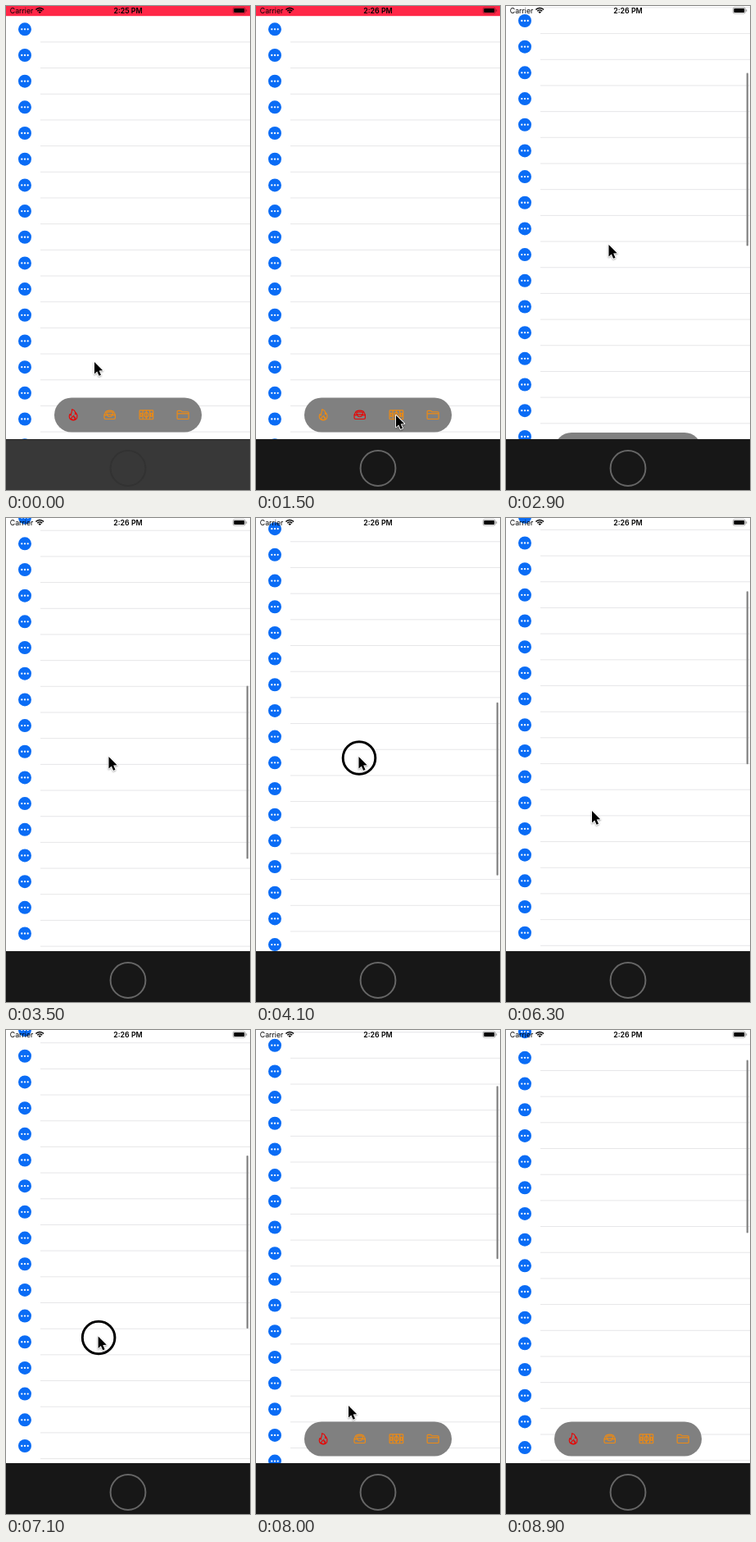
Write an HTML page with a canvas that moves like this. It is 298 px wide and 590 px high and loops after 9 s.

```html
<!DOCTYPE html>
<html lang="en">
<head>
<meta charset="utf-8">
<title>Hiding tab bar</title>
<style>
html, body { margin: 0; width: 100%; height: 100%; overflow: hidden; background: #fff; }
canvas { display: block; width: 298px; height: 590px; }
</style>
</head>
<body>
<canvas id="stage"></canvas>
<script>
const W = 298, H = 590, LOOP = 9000, STEP = 100;
const TOP = 12.2, BOTTOM = 528, PITCH = 31.68, ROWS = 40;
const RED = '#ff2747', ORANGE = '#ee8a12', ACTIVE = '#e80404';
const canvas = document.getElementById('stage');
const c = canvas.getContext('2d');
const dpr = window.devicePixelRatio || 1;
canvas.width = W * dpr;
canvas.height = H * dpr;

const linear = p => p;
const smooth = p => p * p * (3 - 2 * p);
const out = p => 1 - (1 - p) ** 2;

// Each key: [time, value, easing into this key]
function track(keys, t) {
  if (t <= keys[0][0]) return keys[0][1];
  for (let i = 1; i < keys.length; i++) {
    const [t1, v1, ease = linear] = keys[i], [t0, v0] = keys[i - 1];
    if (t <= t1) return v0 + (v1 - v0) * ease((t - t0) / (t1 - t0));
  }
  return keys[keys.length - 1][1];
}

const TAP = 5000;
const listA = [[2400, 0], [2700, 70, smooth], [2900, 168.7], [3900, 530, out],
  [4000, 528], [4100, 522], [4300, 468], [4900, 408, out]];
const listB = [[5600, 0], [5800, 25], [6300, 187.9], [6900, 350, out],
  [7000, 349], [7100, 345], [7400, 260], [9000, 57, out]];
const pillDrop = [[2700, 0], [2900, 42.5], [3000, 54, out], [4300, 54], [4600, 0, out],
  [5800, 0], [6100, 54], [7300, 54], [7600, 0, out]];
const cursorX = [[0, 108], [700, 126, smooth], [1000, 126], [1500, 171, smooth],
  [1900, 171], [2500, 125.5, smooth], [4100, 125.5], [4300, 126], [4850, 82, smooth],
  [5100, 82], [5600, 105, smooth], [6500, 105], [7000, 112.5, smooth],
  [7400, 113], [8100, 113], [8700, 306, smooth]];
const cursorY = [[0, 434], [700, 497, smooth], [1000, 497], [1500, 499, smooth],
  [1900, 499], [2500, 291, smooth], [4100, 291], [4300, 345], [4850, 506, smooth],
  [5100, 506], [5600, 357, smooth], [6500, 357], [7000, 372, smooth],
  [7100, 373.5], [7400, 458], [8100, 458], [8700, 400, smooth]];
const barAlpha = [[2400, 0], [2500, 1], [5000, 1], [5010, 0], [5600, 0], [5700, 1]];
const presses = [[800, 900], [1600, 1700], [4100, 4300], [5000, 5000], [7100, 7400]];

function line(x0, y0, x1, y1) {
  c.beginPath();
  c.moveTo(x0, y0);
  c.lineTo(x1, y1);
  c.stroke();
}

function disc(x, y, r, color) {
  c.fillStyle = color;
  c.beginPath();
  c.arc(x, y, r, 0, 7);
  c.fill();
}

function ring(x, y, r, color, width) {
  c.strokeStyle = color;
  c.lineWidth = width;
  c.beginPath();
  c.arc(x, y, r, 0, 7);
  c.stroke();
}

function box(x, y, w, h, r) {
  c.beginPath();
  c.roundRect(x, y, w, h, r);
}

function drawList(scroll) {
  c.fillStyle = '#fff';
  c.fillRect(0, 0, W, BOTTOM);
  const redEnd = Math.max(0, TOP - scroll);
  c.fillStyle = RED;
  c.fillRect(0, 0, W, redEnd);
  for (let i = 0; i < ROWS; i++) {
    const y = 28.3 + i * PITCH - scroll;
    if (y < -20 || y > BOTTOM + 10) continue;
    disc(23, y, 8, '#0a6cf5');
    for (const dx of [-3.7, 0, 3.7]) disc(23 + dx, y, 1.15, '#fff');
    c.strokeStyle = '#e0e0e2';
    c.lineWidth = 0.8;
    line(42, y + 15.6, W, y + 15.6);
  }
}

function drawScrollbar(scroll, alpha) {
  const view = BOTTOM - TOP, content = ROWS * PITCH;
  const len = 211;
  const y = 13 + scroll / (content - view) * (view - len);
  c.globalAlpha = alpha;
  c.fillStyle = '#8c8c8c';
  box(293.6, y, 2.4, len, 1.2);
  c.fill();
  c.globalAlpha = 1;
}

function drawStatus(time) {
  c.fillStyle = '#000';
  c.textBaseline = 'alphabetic';
  c.textAlign = 'left';
  c.font = '8.7px Inter, Arial, sans-serif';
  c.fillText('Carrier', 4.8, 8.9);
  c.textAlign = 'center';
  c.font = '600 8.8px Inter, Arial, sans-serif';
  c.fillText(time, 149, 8.9);
  // Wi-Fi fan
  c.strokeStyle = '#000';
  c.lineWidth = 1.5;
  for (const r of [3.9, 6.4]) {
    c.beginPath();
    c.arc(41.2, 8.8, r, -Math.PI * 0.77, -Math.PI * 0.23);
    c.stroke();
  }
  c.beginPath();
  c.moveTo(41.2, 9.1);
  c.arc(41.2, 9.1, 2.4, -Math.PI * 0.76, -Math.PI * 0.24);
  c.fill();
  // Battery
  c.strokeStyle = 'rgba(0,0,0,.45)';
  c.lineWidth = 0.7;
  box(277.2, 1.9, 15.2, 7.2, 2);
  c.stroke();
  box(278.3, 3, 13, 5, 1.1);
  c.fill();
  c.fillStyle = 'rgba(0,0,0,.5)';
  c.fillRect(293.3, 4.3, 0.9, 2.4);
}

function flame() {
  c.beginPath();
  c.moveTo(-1.6, -6.8);
  c.bezierCurveTo(2.8, -5.4, 3.2, -2.5, 2.4, -0.6);
  c.quadraticCurveTo(3.4, -1, 3.5, -2.4);
  c.bezierCurveTo(6.3, 1.6, 5, 6.4, 0.2, 6.6);
  c.bezierCurveTo(-4.8, 6.4, -5.6, 2.4, -4.1, -0.8);
  c.quadraticCurveTo(-3.3, 0.6, -2.6, 0.8);
  c.bezierCurveTo(-3.3, -2.6, -0.2, -3.4, -1.6, -6.8);
  c.moveTo(0.3, 1);
  c.bezierCurveTo(-0.2, 2.8, -2.6, 2.8, -2.2, 4.6);
  c.quadraticCurveTo(-1.5, 6.1, 0.2, 6.2);
  c.quadraticCurveTo(3.2, 5.8, 2.2, 3);
  c.quadraticCurveTo(1.6, 3.8, 1.2, 3.6);
  c.quadraticCurveTo(1.6, 2, 0.3, 1);
  c.stroke();
}

function tray() {
  c.beginPath();
  c.moveTo(-6.7, 0);
  c.lineTo(-4.6, -4);
  c.quadraticCurveTo(0, -6.4, 4.6, -4);
  c.lineTo(6.7, 0);
  c.lineTo(6.7, 3.8);
  c.quadraticCurveTo(6.7, 5.2, 5.3, 5.2);
  c.lineTo(-5.3, 5.2);
  c.quadraticCurveTo(-6.7, 5.2, -6.7, 3.8);
  c.closePath();
  c.moveTo(-6.7, 0.3);
  c.lineTo(-3, 0.3);
  c.quadraticCurveTo(-2.4, 2.4, 0, 2.4);
  c.quadraticCurveTo(2.4, 2.4, 3, 0.3);
  c.lineTo(6.7, 0.3);
  c.moveTo(4, -1.8);
  c.ellipse(0, -1.8, 4, 1.6, 0, 0, 7);
  c.stroke();
}

function note() {
  box(-8.3, -5.4, 16.6, 10.8, 0.8);
  c.stroke();
  c.beginPath();
  c.ellipse(0, 0, 2.3, 3, 0, 0, 7);
  c.stroke();
  line(0, -5.4, 0, 5.4);
  for (const s of [-1, 1]) {
    line(s * 4.2, -5.4, s * 4.2, 5.4);
    box(s * 6.2 - 1.1, -2, 2.2, 4, 0.8);
    c.stroke();
  }
}

function folder() {
  c.beginPath();
  c.moveTo(-7, -4);
  c.quadraticCurveTo(-7, -5, -6, -5);
  c.lineTo(-2.6, -5);
  c.lineTo(-1.2, -3.6);
  c.lineTo(6, -3.6);
  c.quadraticCurveTo(7, -3.6, 7, -2.6);
  c.lineTo(7, 4.2);
  c.quadraticCurveTo(7, 5.2, 6, 5.2);
  c.lineTo(-6, 5.2);
  c.quadraticCurveTo(-7, 5.2, -7, 4.2);
  c.closePath();
  c.moveTo(-7, -1.5);
  c.lineTo(7, -1.5);
  c.stroke();
}

const icons = [flame, tray, note, folder];

function drawPill(drop, selected) {
  c.fillStyle = '#808080';
  box(59, 477.5 + drop, 180, 42, 21);
  c.fill();
  icons.forEach((icon, i) => {
    c.save();
    c.translate(82 + i * 44.7, 498.3 + drop);
    c.strokeStyle = i === selected ? ACTIVE : ORANGE;
    c.lineWidth = 1.15;
    c.lineJoin = 'round';
    icon();
    c.restore();
  });
}

function drawBezel(dimmed) {
  c.fillStyle = dimmed ? '#383838' : '#171717';
  c.fillRect(0, BOTTOM, W, H - BOTTOM);
  if (dimmed) {
    c.fillStyle = '#242424';
    c.fillRect(0, BOTTOM, W, 1);
  }
  ring(149, 563.5, 21.4, dimmed ? '#323232' : '#666', 2);
}

function drawCursor(x, y) {
  c.save();
  c.translate(x, y);
  c.beginPath();
  c.moveTo(0, 0);
  c.lineTo(0, 14.4);
  c.lineTo(3.3, 11.4);
  c.lineTo(5.6, 16.8);
  c.lineTo(8, 15.7);
  c.lineTo(5.7, 10.5);
  c.lineTo(10.2, 10.2);
  c.closePath();
  c.shadowColor = 'rgba(0,0,0,.35)';
  c.shadowBlur = 2 * dpr;
  c.shadowOffsetY = dpr;
  c.strokeStyle = '#fff';
  c.lineWidth = 1.8;
  c.lineJoin = 'round';
  c.stroke();
  c.shadowColor = 'transparent';
  c.fillStyle = '#000';
  c.fill();
  c.restore();
}

function selectedTab(t) {
  if (t < 900 || t > TAP) return 0;
  return t < 1700 ? 1 : 2;
}

function draw(t) {
  c.setTransform(dpr, 0, 0, dpr, 0, 0);
  const scroll = track(t > TAP ? listB : listA, t);
  drawList(scroll);
  drawScrollbar(scroll, track(barAlpha, t));
  drawPill(track(pillDrop, t), selectedTab(t));
  drawStatus(t < 1200 ? '2:25 PM' : '2:26 PM');
  drawBezel(t < 800);
  const x = track(cursorX, t), y = track(cursorY, t);
  if (presses.some(([a, b]) => t >= a && t <= b)) ring(x + 0.5, y + 1.5, 19.8, '#000', 3);
  drawCursor(x, y);
}

const start = performance.now();
function tick() {
  const t = (performance.now() - start) % LOOP;
  draw(Math.floor(t / STEP) * STEP);
  requestAnimationFrame(tick);
}
tick();
</script>
</body>
</html>
```
